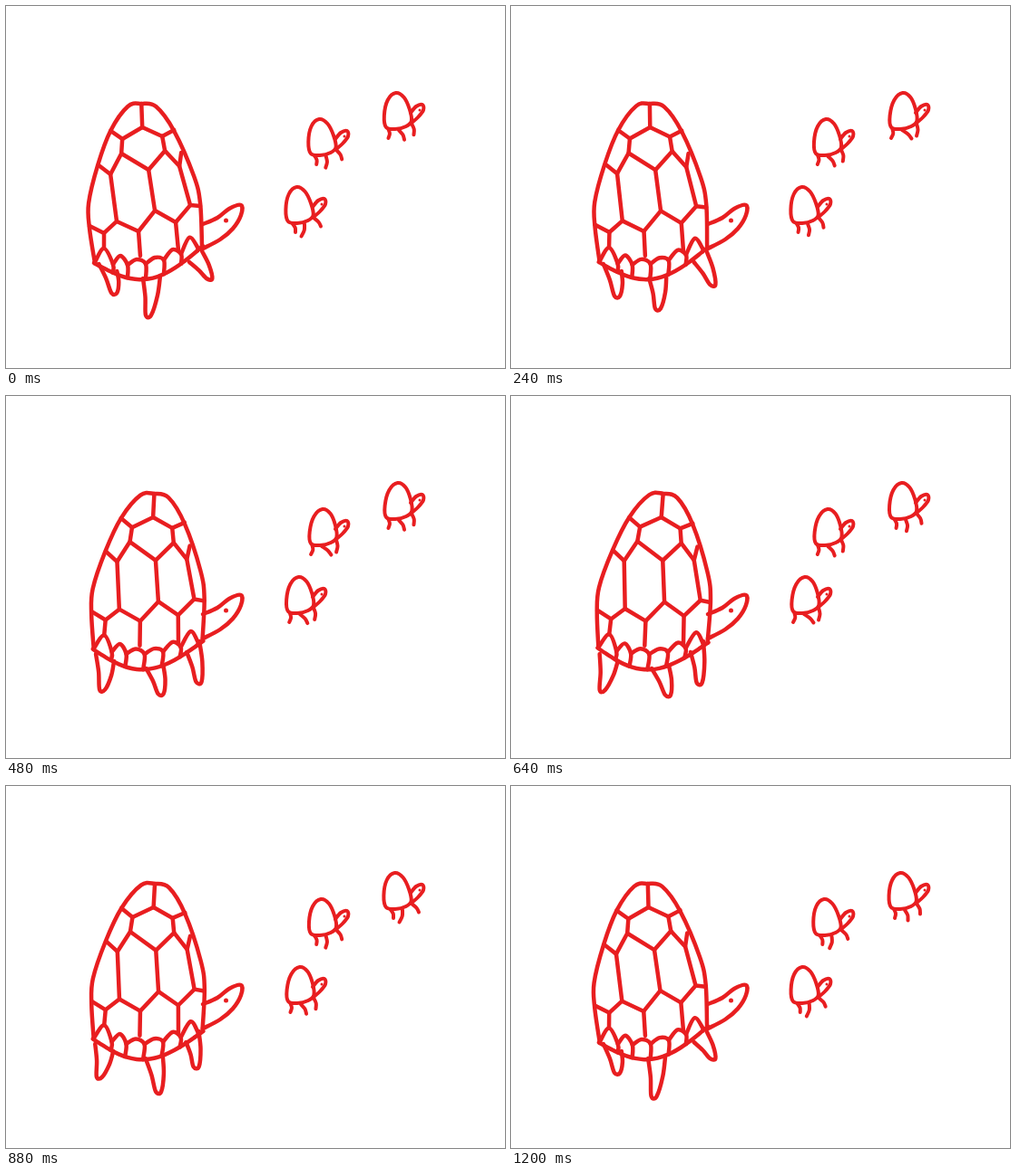
An HTML page with a canvas for the animation above (1.28 s loop, 550 by 400 pixels).

```html
<!DOCTYPE html>
<html lang="en">
<head>
<meta charset="utf-8">
<title>Walking turtles</title>
<style>
html, body { margin: 0; width: 100%; height: 100%; overflow: hidden; background: #fff; }
canvas { display: block; }
</style>
</head>
<body>
<canvas id="stage" width="550" height="400"></canvas>
<script>
const ctx = document.getElementById('stage').getContext('2d');
const STEP = 80, STEPS = 16;
const RED = '#e81e20';

// Shell in its upright pose.
const RIM = [
  [98,284], [92,246], [91,218], [101,176], [115,138], [134,111],
  [149,108], [165,111], [185,138], [207,188], [214,218], [216,265]
];
const NODES = {
  A: [149,108], B: [150,134], C: [115,138], D: [128,147], E: [172,144], F: [185,137],
  G: [127,163], H: [102,176], I: [115,186], J: [157,181], K: [175,160], L: [191,177],
  M: [122,238], N: [146,249], O: [164,226], P: [187,239], Q: [203,220], R: [214,221],
  S: [92,243], T: [108,251], U: [108,268], V: [148,276], W: [190,270], X: [193,162]
};
const SEAMS = ['AB', 'CDBEF', 'DGIH', 'GJKE', 'KLQR', 'XL', 'IMTS', 'MNOJ', 'OPQ', 'TU', 'NV', 'PW'];
const JOINTS = [98, 118, 134, 154, 174, 193, 211];
const HEAD = [[217,241], [233,234], [246,224], [259,220], [259,231], [250,246], [236,258], [217,268]];

// Hips a and b, mean place of the foot, its stride and lift, and the step of its farthest reach.
const LEGS = [
  { a: [100,285], b: [120,293], foot: [110,321], stride: 10, lift: 4, reach: 1 },
  { a: [153,301], b: [172,298], foot: [165,336], stride: 8, lift: 7, reach: 8 },
  { a: [200,283], b: [214,271], foot: [216,309], stride: 9, lift: 8, reach: 1 }
];

// Hatchlings share one drawing; each has an offset and a lag in steps.
const EGG = [[430,96], [421,104], [417,121], [419,134], [429,136], [441,133], [447,127], [445,114], [439,101]];
const SNOUT = [[446,118], [452,111], [459,109], [460,115], [454,123], [447,129]];
const PAWS = [
  { hip: [422,136], foot: [423,146], sway: 1.5, stride: 4, lift: 0 },
  { hip: [434,137], foot: [437.5,148.5], sway: 3, stride: -4, lift: 2 },
  { hip: [447,130], foot: [451,141.5], sway: 0, stride: 4, lift: -2 }
];
const YOUNG = [[0, 0, 0], [-83, 29, 2.5], [-108, 104, 5]];

const angle = steps => steps / STEPS * Math.PI * 2;
const mid = (p, q, dx) => [(p[0] + q[0]) / 2 + dx, (p[1] + q[1]) / 2];

function line(pts) {
  ctx.beginPath();
  pts.forEach(p => ctx.lineTo(...p));
  ctx.stroke();
}

// Curve through all points.
function curve(pts, closed) {
  const n = pts.length;
  const at = i => pts[closed ? (i + n) % n : Math.max(0, Math.min(n - 1, i))];
  ctx.beginPath();
  ctx.moveTo(...pts[0]);
  for (let i = 0; i < (closed ? n : n - 1); i++) {
    const a = at(i - 1), b = at(i), c = at(i + 1), d = at(i + 2);
    ctx.bezierCurveTo(
      b[0] + (c[0] - a[0]) / 6, b[1] + (c[1] - a[1]) / 6,
      c[0] - (d[0] - b[0]) / 6, c[1] - (d[1] - b[1]) / 6,
      c[0], c[1]);
  }
  ctx.stroke();
}

function dot(x, y, r) {
  ctx.beginPath();
  ctx.arc(x, y, r, 0, Math.PI * 2);
  ctx.fill();
}

// Lower edge of the shell: a chord sagging as a half sine.
function belly(x) {
  const u = (x - 97) / 120;
  return 284 - 19 * u + 27 * Math.sin(Math.PI * u);
}

function drawShell(step) {
  const lean = (1 - Math.cos(angle(step - .6))) / 2;
  // The top shifts forward while the whole shell tips to the right.
  const place = ([x, y]) => [x + lean * (270 - y) * .117, y + lean * (x - 150) * .11];

  curve(RIM.map(place));
  const edge = [];
  for (let x = 97; x <= 217; x += 10) edge.push(place([x, belly(x)]));
  curve(edge);
  SEAMS.forEach(s => line([...s].map(c => place(NODES[c]))));

  const shoulder = x => [x, belly(x) - 17 * Math.sin(Math.PI * (x - 95) / 125)];
  for (let i = 1; i < JOINTS.length; i++) {
    const l = JOINTS[i - 1], r = JOINTS[i], m = (l + r) / 2;
    curve([shoulder(l), [m, belly(m) - 22], shoulder(r), [r, belly(r)]].map(place));
  }
}

function drawLeg({ a, b, foot, stride, lift, reach }, step) {
  const t = angle(step - reach);
  const swing = stride * Math.cos(t);
  const x = foot[0] + swing, y = foot[1] + lift * Math.cos(t - 2.5);
  const hip = p => [p[0] + swing * .25, p[1]];
  const back = [x - 3, y], front = [x + 3, y];
  curve([hip(a), mid(hip(a), back, 1), back, front, mid(hip(b), front, 2), hip(b)]);
}

function drawPaw({ hip, foot, sway, stride, lift }, step) {
  const c = Math.cos(angle(step - 11));
  const top = [hip[0] + sway * c, hip[1]];
  const tip = [foot[0] + stride * c, foot[1] + lift * c];
  curve([top, mid(top, tip, 1.5), tip]);
}

function drawParent(step) {
  ctx.lineWidth = 4.5;
  drawShell(step);
  LEGS.forEach(leg => drawLeg(leg, step));
  curve(HEAD);
  dot(242.5, 237, 2.5);
}

function drawYoung([dx, dy, lag], step) {
  const s = step - lag;
  const sway = 2 * Math.sin(angle(s - .5));
  ctx.save();
  ctx.translate(dx, dy);
  ctx.lineWidth = 4;
  curve(EGG.map(([x, y]) => [x + sway * (136 - y) / 40, y]), true);
  curve(SNOUT);
  dot(456, 115, 1.5);
  PAWS.forEach(paw => drawPaw(paw, s));
  ctx.restore();
}

function frame(now) {
  const step = Math.floor(now / STEP) % STEPS;
  ctx.fillStyle = '#fff';
  ctx.fillRect(0, 0, 550, 400);
  ctx.strokeStyle = ctx.fillStyle = RED;
  ctx.lineCap = ctx.lineJoin = 'round';
  drawParent(step);
  YOUNG.forEach(y => drawYoung(y, step));
  requestAnimationFrame(() => frame(performance.now()));
}
frame(0);
</script>
</body>
</html>
```
